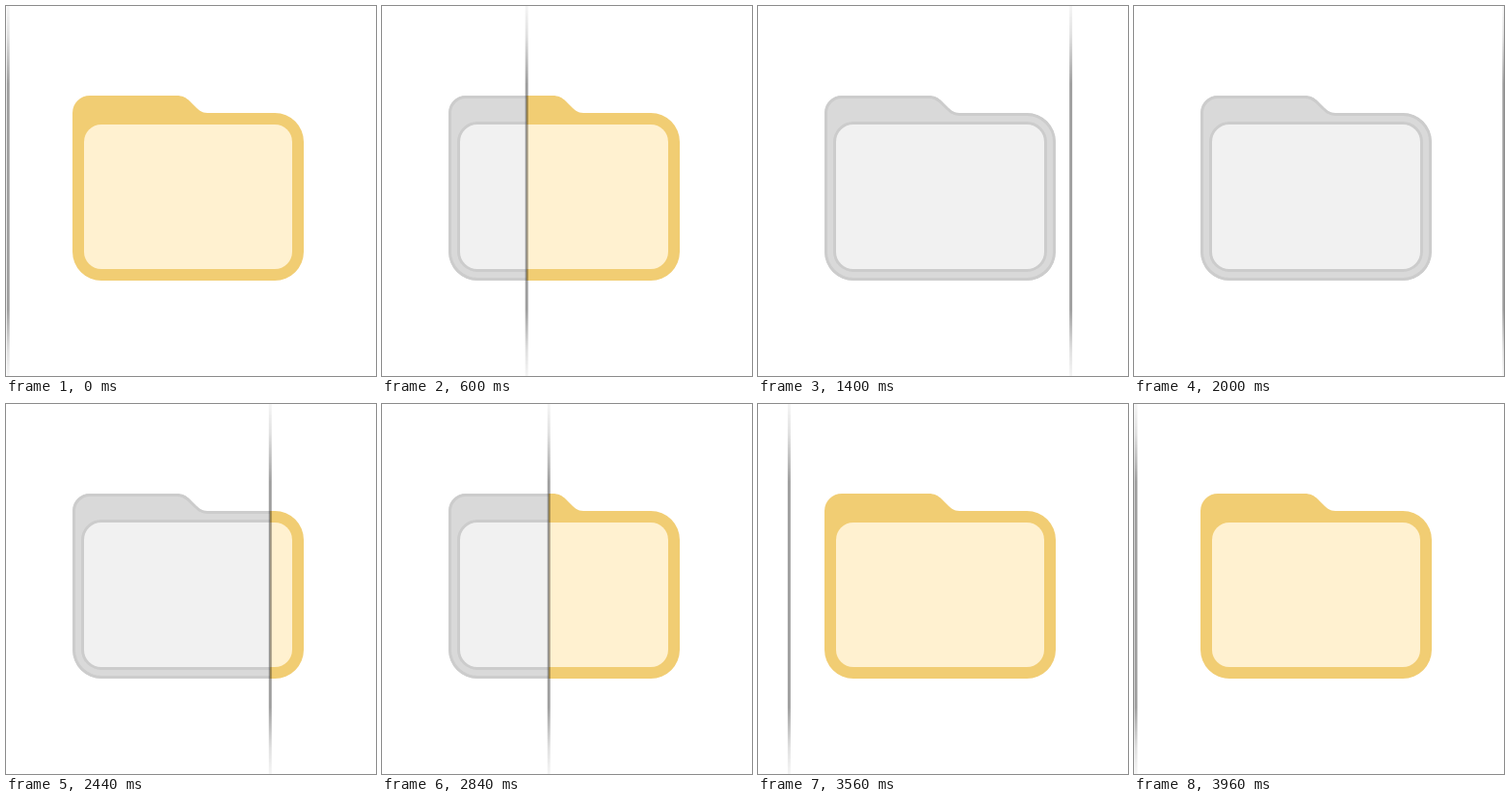
An HTML page for the animation above (4000 ms loop, 384 by 384 pixels).

```html
<!DOCTYPE html>
<html lang="en">
<head>
<meta charset="utf-8">
<title>Folder wipe</title>
<style>
  html, body {
    margin: 0;
    width: 100%;
    height: 100%;
    overflow: hidden;
    background: #fff;
  }
  svg {
    position: absolute;
    top: 0;
    left: 0;
    width: 384px;
    height: 384px;
  }
  .gray { animation: reveal 4s infinite; }
  .line {
    position: absolute;
    top: 0;
    left: -1.5px;
    width: 3px;
    height: 384px;
    background: linear-gradient(
      rgba(0, 0, 0, .04) 0,
      rgba(0, 0, 0, .12) 8%,
      rgba(0, 0, 0, .38) 21%,
      rgba(0, 0, 0, .38) 82%,
      rgba(0, 0, 0, .12) 93%,
      rgba(0, 0, 0, .04) 100%);
    animation: sweep 4s infinite;
  }
  .gray, .line { animation-timing-function: cubic-bezier(.167, .167, .667, 1); }

  /* The way back is slightly shorter, then rests until the loop restarts. */
  @keyframes sweep {
    0%, 99%, 100% { transform: translateX(1.5px); }
    50% { transform: translateX(383.5px); }
  }
  @keyframes reveal {
    0%, 99%, 100% { clip-path: inset(0 382.5px 0 0); }
    50% { clip-path: inset(0 .5px 0 0); }
  }
</style>
</head>
<body>
<svg viewBox="0 0 384 384">
  <defs>
    <path id="folder" d="M87 93H177C183 93 187 95 191 99L196 104C200 108 203 111 209 111H279A30 30 0 0 1 309 141V255A30 30 0 0 1 279 285H99A30 30 0 0 1 69 255V111A18 18 0 0 1 87 93Z"/>
    <clipPath id="inside"><use href="#folder"/></clipPath>
  </defs>
  <use href="#folder" fill="#f1cd73"/>
  <rect x="81" y="123" width="216" height="150" rx="18" fill="#fff1d0"/>
</svg>
<svg class="gray" viewBox="0 0 384 384">
  <rect width="384" height="384" fill="#fff"/>
  <use href="#folder" fill="#d9d9d9" stroke="#ccc" stroke-width="6" clip-path="url(#inside)"/>
  <rect x="79.5" y="121.5" width="219" height="153" rx="19.5" fill="#f1f1f1" stroke="#ccc" stroke-width="3"/>
</svg>
<div class="line"></div>
</body>
</html>
```
